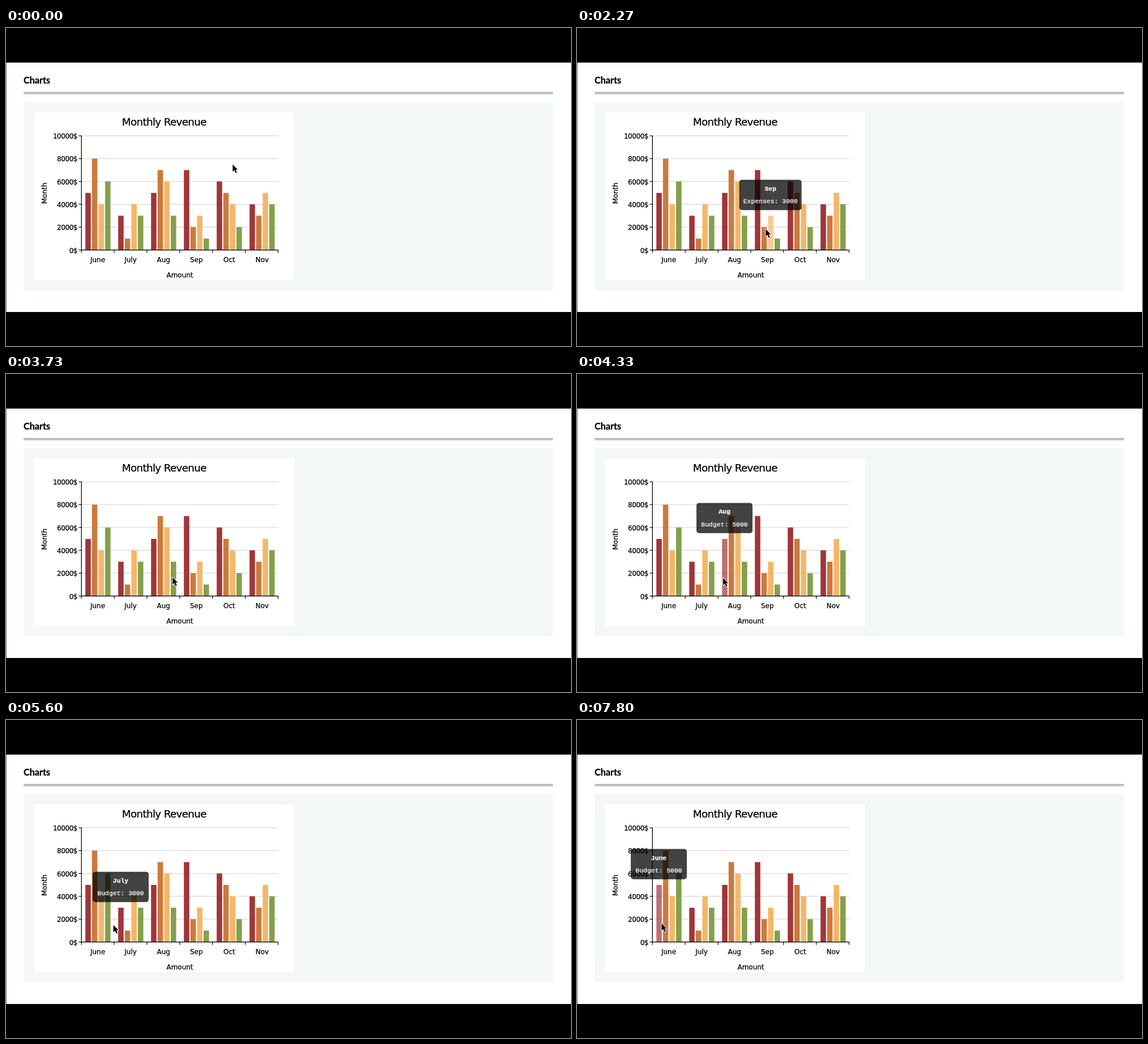
Write an HTML page with a canvas that moves like this. It is 998 px wide and 561 px high and loops after 9530 ms.

```html
<!DOCTYPE html>
<html>
<head>
<meta charset="utf-8">
<style>
html, body { margin: 0; width: 100%; height: 100%; overflow: hidden; background: #000; }
canvas { display: block; }
</style>
</head>
<body>
<canvas width="998" height="561"></canvas>
<script>
const ctx = document.querySelector('canvas').getContext('2d');
const LOOP = 9530, BASE = 391.6, UNIT = 20.14;
const LAG = 60, LINGER = 200, SLIDE = 100;
const SANS = '"DejaVu Sans", Verdana, sans-serif';
const MONO = '"Liberation Mono", "Courier New", monospace';
const LABEL = `12px ${SANS}`;

const months = ['June', 'July', 'Aug', 'Sep', 'Oct', 'Nov'];
const series = [
  { name: 'Budget', color: '#a03639', values: [5, 3, 5, 7, 6, 4] },
  { name: 'Income', color: '#ca7a3d', values: [8, 1, 7, 2, 5, 3] },
  { name: 'Expenses', color: '#f4b768', values: [4, 4, 6, 3, 4, 5] },
  { name: 'Profit', color: '#83a04c', values: [6, 3, 3, 1, 2, 4] }
];
const bars = series.flatMap(({ name, color, values }, s) => values.map((value, m) => ({
  month: months[m], name, color, value,
  x: 140.2 + m * 58 + s * 11.6, y: BASE - value * UNIT, w: 9.6, h: value * UNIT
})));

// pointer moves: start, end, x, y
const moves = [
  [400, 1200, 360, 375], [1470, 1730, 342, 371], [2200, 2270, 333, 354],
  [2270, 2930, 317, 358], [3070, 3300, 299, 358], [3300, 3500, 304, 358],
  [3670, 3730, 294, 358], [3730, 6530, 153, 362], [7270, 7800, 149, 358]
];

const lerp = (a, b, u) => a + (b - a) * u;
const easeOut = (u, power) => 1 - (1 - Math.min(1, u)) ** power;

function pointerAt(t) {
  let x = 400, y = 240;
  for (const [start, end, toX, toY] of moves) {
    if (t < start) break;
    const u = easeOut((t - start) / (end - start), 1.23);
    x = lerp(x, toX, u);
    y = lerp(y, toY, u);
  }
  return [x, y];
}

function barAt([x, y]) {
  return bars.find(b => x >= b.x - 1 && x < b.x + b.w + 1 && y > b.y && y < BASE);
}

// every stretch of time the pointer spends on one bar
const hovers = [];
for (let t = 0, last; t < LOOP; t += 5) {
  const bar = barAt(pointerAt(t - LAG));
  if (bar && bar !== last) hovers.push({ bar, start: t });
  if (bar) hovers.at(-1).end = t + 5;
  last = bar;
}

function rect(x, y, w, h, color) {
  ctx.fillStyle = color;
  ctx.fillRect(x, y, w, h);
}

function text(str, x, y, font, { align = 'center', color = '#000', spacing = 0 } = {}) {
  ctx.font = font;
  ctx.textAlign = align;
  ctx.letterSpacing = spacing + 'px';
  ctx.fillStyle = ctx.strokeStyle = color;
  ctx.lineWidth = 0.25;
  ctx.fillText(str, x, y);
  ctx.strokeText(str, x, y);
}

function drawPage() {
  rect(0, 0, 998, 561, '#000');
  rect(0, 61, 998, 440, '#fff');
  rect(0, 61, 1, 440, '#777');
  text('Charts', 31, 98, 'bold 16.2px Lato, sans-serif', { align: 'left' });
  for (const y of [113.2, 115.4]) rect(31, y, 935, 1, '#777');
  rect(31, 131, 935, 331.5, '#f3f7f8');
  rect(49.3, 149, 459.7, 296, '#fff');
}

function drawChart(active) {
  text('Monthly Revenue', 279.3, 172, `18.4px ${SANS}`, { spacing: -0.7 });
  for (let k = 0; k <= 5; k++) {
    const y = BASE - k * 2 * UNIT;
    if (k) rect(133, y - 0.8, 348, 1.5, '#dedede');
    rect(128.5, y - 0.6, 5, 1.2, '#000');
    text(k * 2000 + '$', 126, y + 5, LABEL, { align: 'right', spacing: -0.45 });
  }
  for (const bar of bars) {
    ctx.globalAlpha = bar === active ? 0.7 : 1;
    rect(bar.x, bar.y, bar.w, bar.h, bar.color);
  }
  ctx.globalAlpha = 1;
  months.forEach((name, m) => text(name, 162 + m * 58.1, 413.3, LABEL));
  rect(132.6, 190, 1.3, 202, '#000');
  rect(132.6, BASE - 0.6, 348, 1.3, '#000');
  for (let m = 0; m <= 6; m++) rect(132.6 + m * 57.9, BASE, 1.2, 5, '#000');
  text('Amount', 307, 440, LABEL);
  ctx.save();
  ctx.translate(72, 291.5);
  ctx.rotate(-Math.PI / 2);
  text('Month', 0, 0, LABEL);
  ctx.restore();
}

function drawTooltip(t) {
  const i = hovers.findLastIndex(h => h.start <= t);
  if (i < 0 || t > hovers[i].end + LINGER) return;
  const { bar, start } = hovers[i], previous = hovers[i - 1];
  const from = previous && start <= previous.end + LINGER ? previous.bar : bar;
  const u = easeOut((t - start) / SLIDE, 3);
  const x = lerp(from.x, bar.x, u) + 4.3, y = lerp(from.y, bar.y, u) - 63.4;
  const line = `${bar.name}: ${bar.value * 1000}`;
  const width = line.length * 5.5 + 33;
  ctx.fillStyle = 'rgba(0,0,0,0.74)';
  ctx.beginPath();
  ctx.roundRect(x - width / 2, y, width, 53.4, 4.5);
  ctx.fill();
  text(bar.month, x, y + 19, `bold 11.45px ${MONO}`, { color: '#fff' });
  text(line, x, y + 41.7, `11.45px ${MONO}`, { color: '#fff' });
}

function drawPointer([x, y]) {
  const arrow = new Path2D('M0 0V12.8L3 10 5.2 15.2 7.4 14.2 5.2 9.2H9Z');
  ctx.save();
  ctx.translate(x + 0.4, y + 0.7);
  ctx.lineJoin = 'round';
  ctx.lineWidth = 1.8;
  ctx.strokeStyle = '#fff';
  ctx.stroke(arrow);
  ctx.fillStyle = '#000';
  ctx.fill(arrow);
  ctx.restore();
}

function frame() {
  const t = performance.now() % LOOP;
  drawPage();
  drawChart(barAt(pointerAt(t - LAG)));
  drawTooltip(t);
  drawPointer(pointerAt(t));
  requestAnimationFrame(frame);
}
frame();
</script>
</body>
</html>
```
